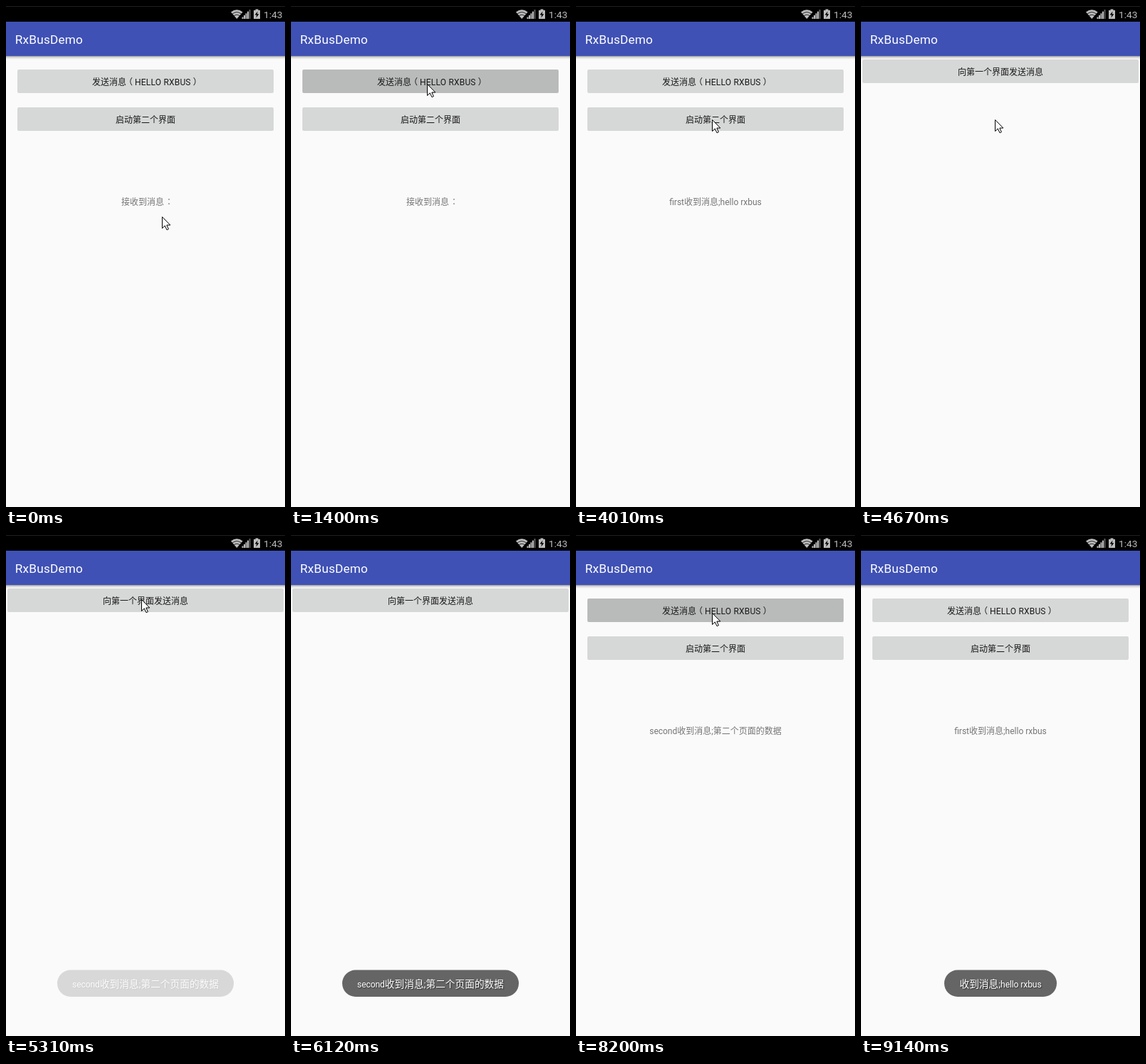
Write an HTML page that moves like this. It is 392x702 px and loops after 9730 ms.

```html
<!DOCTYPE html>
<html lang="zh-CN">
<head>
<meta charset="utf-8">
<title>RxBusDemo</title>
<style>
  html, body { margin: 0; width: 100%; height: 100%; overflow: hidden; background: #fafafa; }
  svg { display: block; width: 392px; height: 702px; }
  text { font: 12px Roboto, "Noto Sans CJK SC", "Noto Sans CJK", sans-serif; }
  .mid { text-anchor: middle; }
  .btn text { fill: #181818; }
  .caps { letter-spacing: .2px; }
  .title { font-size: 17.2px; letter-spacing: .2px; fill: #fff; }
  .clock { font-size: 13.7px; fill: #bdbdbd; }
  .note { fill: #757575; }
  .toast text { font-size: 13.7px; fill: #fff; text-shadow: 1px 1px 1px #333; }
  .toast .latin { font-size: 12.2px; letter-spacing: -.15px; }
</style>
</head>
<body>
<svg viewBox="0 0 392 702">
  <defs>
    <linearGradient id="shade" x2="0" y2="1">
      <stop offset="0" stop-color="#000" stop-opacity=".4"/>
      <stop offset=".4" stop-color="#000" stop-opacity=".13"/>
      <stop offset="1" stop-color="#000" stop-opacity="0"/>
    </linearGradient>
    <g id="page">
      <rect width="392" height="702" fill="#fafafa"/>
      <rect y="22" width="392" height="48" fill="#3f51b5"/>
      <rect y="70" width="392" height="5" fill="url(#shade)"/>
      <text class="title" x="12.8" y="53">RxBusDemo</text>
    </g>
  </defs>

  <g id="first">
    <use href="#page"/>
    <g class="btn">
      <rect id="send" x="16" y="89" width="360" height="33" rx="2"/>
      <text x="121" y="110.5">发送消息<tspan dx="-3">（</tspan><tspan class="caps" dx="3">HELLO RXBUS</tspan><tspan dx="3">）</tspan></text>
    </g>
    <g class="btn">
      <rect id="open" x="16" y="142" width="360" height="33" rx="2"/>
      <text class="mid" x="196" y="163.7">启动第二个界面</text>
    </g>
    <text id="note" class="mid note" x="196" y="278.7"></text>
  </g>

  <g id="second">
    <use href="#page"/>
    <g class="btn">
      <rect id="reply" x="2" y="75" width="388" height="33" rx="2"/>
      <text class="mid" x="196" y="96.8">向第一个界面发送消息</text>
    </g>
  </g>

  <g id="status">
    <rect width="392" height="22"/>
    <rect width="392" height="1" fill="#202020"/>
    <path d="M324.3 18L316 8.6Q324.3 2 332.6 8.6Z" fill="#bdbdbd"/>
    <path d="M317.5 11.4Q324.3 5.8 331.1 11.4M319.6 14.2Q324.3 10.4 329 14.2" fill="none" stroke="#000" stroke-width=".8"/>
    <g id="bars" fill="#bdbdbd"></g>
    <path d="M350.5 4.5H354.5V6H357V18H348V6H350.5Z" fill="#bdbdbd"/>
    <path d="M353.6 7.5L349.6 12.6H352.2L351.4 16.5L355.4 11.2H352.8Z"/>
    <text class="clock" x="362" y="17">1:43</text>
  </g>

  <g id="toast" class="toast">
    <rect id="pill" y="609.5" height="37.5" rx="18.75" fill="#656565"/>
    <text id="say" class="mid" x="196" y="634"></text>
  </g>

  <path id="cursor" d="M.5 .5V16.5L4.3 12.9L7 18.7L9.4 17.6L6.8 12H11.8Z"
        fill="#fff" stroke="#000"/>
</svg>
<script>
const LOOP = 9730;
const SENT = [1550, 5310, 8470];   // moments a message arrives
const OPEN = 4280, CLOSE = 6950;   // second screen

// Pointer glides, each starting where the last one ended
const glides = [
  { from: 660, to: 1300, x: 191, y: 109 },
  { from: 2250, to: 2251, x: 191, y: 159 },
  { from: 4540, to: 4670, x: 188, y: 159 },
  { from: 4790, to: 5060, x: 190, y: 90 },
  { from: 5590, to: 6120, x: 344, y: 640 },
  { from: 6950, to: 7490, x: 183, y: 189 },
  { from: 7610, to: 7890, x: 191, y: 109 },
  { from: 8600, to: 9140, x: 340, y: 690 },
];

const $ = id => document.getElementById(id);
const clamp = u => Math.min(1, Math.max(0, u));
const smooth = u => u * u * (3 - 2 * u);
const within = (t, a, b) => t >= a && t < b;
const show = (id, on) => $(id).setAttribute("display", on ? "inline" : "none");
const press = (id, on) => $(id).setAttribute("fill", on ? "#b9bbba" : "#d6d7d7");

function setHTML(id, html) {
  const el = $(id);
  if (el.dataset.html !== html) el.innerHTML = el.dataset.html = html;
}

function pointerAt(t) {
  let x = 219, y = 295;
  for (const g of glides) {
    const u = smooth(clamp((t - g.from) / (g.to - g.from)));
    x += (g.x - x) * u;
    y += (g.y - y) * u;
  }
  return [x, y].map(Math.round);
}

const toastAlpha = t => Math.max(...SENT.map(s =>
  Math.min(clamp((t - s + 100) / 450), clamp((s + 2460 - t) / 420))));

function draw(t) {
  const fromSecond = within(t, SENT[1], SENT[2]);

  press("send", within(t, 1400, SENT[0]) || within(t, 8200, SENT[2]));
  press("open", within(t, 3570, 3860));
  press("reply", within(t, 5060, SENT[1]));
  setHTML("note", t < SENT[0]
    ? '<tspan dx="4">接收到消息</tspan><tspan dx="4" dy="-1">：</tspan>'
    : fromSecond ? "second收到消息;第二个页面的数据" : "first收到消息;hello rxbus");

  const grow = clamp((t - OPEN + 100) / 360);
  const scale = 1 - .2 * (1 - grow) ** 2;
  show("second", within(t, OPEN, CLOSE));
  $("second").setAttribute("opacity", grow);
  $("second").setAttribute("transform",
    `translate(196 351) scale(${scale}) translate(-196 -351)`);

  const alpha = toastAlpha(t);
  const width = fromSecond ? 248 : 158;
  show("toast", alpha > 0);
  $("toast").setAttribute("opacity", alpha);
  $("pill").setAttribute("x", 196 - width / 2);
  $("pill").setAttribute("width", width);
  setHTML("say", fromSecond
    ? '<tspan class="latin">second</tspan>收到消息;第二个页面的数据'
    : '收到消息;<tspan class="latin">hello rxbus</tspan>');

  show("cursor", !within(t, 6120, 7000) && t < 9140);
  $("cursor").setAttribute("transform", `translate(${pointerAt(t).join(" ")})`);
}

// Signal strength: rising bars, the last one dim
for (let i = 0; i < 5; i++) {
  const h = 2.5 + i * 2.6;
  $("bars").innerHTML += `<rect x="${331.5 + i * 2.5}" y="${18 - h}" width="2"
    height="${h}" opacity="${i < 4 ? 1 : .5}"/>`;
}

const start = performance.now();
function frame() {
  draw((performance.now() - start) % LOOP);
  requestAnimationFrame(frame);
}
frame();
</script>
</body>
</html>
```
